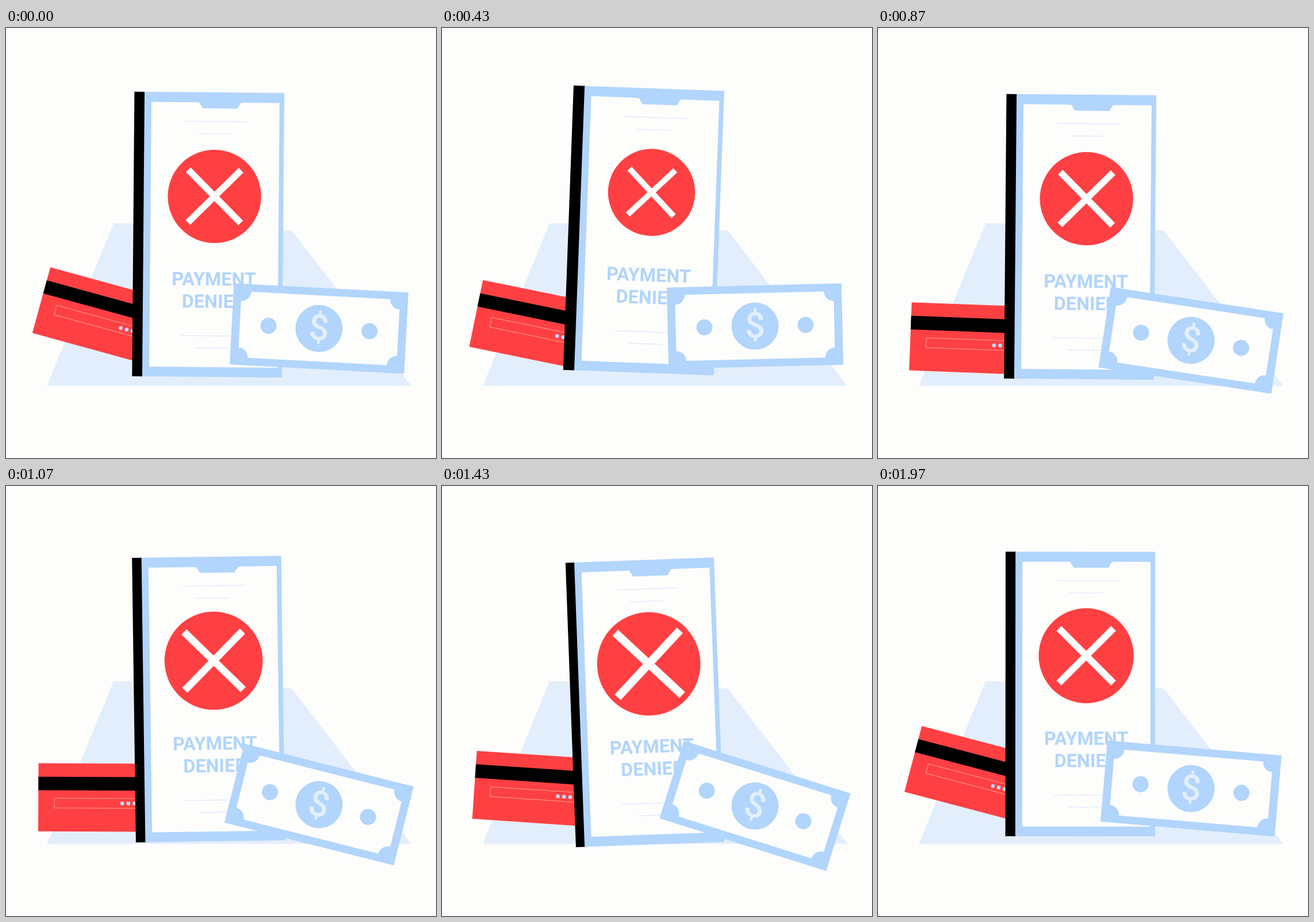
An HTML page for the animation above (2 s loop, 748x748 px).

```html
<!DOCTYPE html>
<html lang="en">
<head>
<meta charset="utf-8">
<title>Payment denied</title>
<style>
  html, body { margin: 0; width: 100%; height: 100%; overflow: hidden; background: #fdfdfc; }
  svg { display: block; width: 100vw; height: 100vh; }
  text { font-family: Roboto, Arial, sans-serif; text-anchor: middle; }
  .blue { fill: #b1d5fc; }
  .pale { fill: #e3eefc; }
  .red { fill: #ff4042; }
  .white { fill: #fdfdfc; }
  .rule { fill: none; stroke: #c8defb; stroke-width: .8; }
  .cross { fill: none; stroke: #fdfdfc; stroke-width: 12; }
  .label { font-size: 32.4px; font-weight: 700; }
  .dollar { font-size: 62px; font-weight: 500; }
</style>
</head>
<body>
<svg viewBox="0 0 748 748">
  <path class="pale" d="M187 340H300V352H497L705 622.5H71Z"/>

  <g id="card">
    <rect class="red" x="-146" y="-59.25" width="198" height="118.5"/>
    <rect x="-146" y="-35.8" width="198" height="23.6"/>
    <rect x="-118" y="1.5" width="155" height="17" fill="none" stroke="#ffa79c" stroke-width=".9"/>
    <g fill="#b8d9fb">
      <circle cy="10.2" r="3.4"/>
      <circle cx="10.6" cy="10.2" r="3.4"/>
      <circle cx="21.2" cy="10.2" r="3.4"/>
    </g>
  </g>

  <g id="phone">
    <rect id="edge" y="-247.5" height="495"/>
    <rect class="blue" x="-121.5" y="-247.5" width="243" height="495"/>
    <path class="white" d="M-109.5 -230H-26.5L-20 -219.5H40L46.5 -230H113.5V230.5H-109.5Z"/>
    <path class="rule" d="M-51.5 -197H58M-27.5 -175.5H30.5M-54.5 176H58M-27.5 197H30.5"/>
    <g id="badge">
      <circle class="red" r="82.8"/>
      <path id="cross" class="cross" d="M-47.7 -47.7L47.7 47.7M47.7 -47.7L-47.7 47.7"/>
    </g>
    <text class="label blue" x="1.8" y="88.4">PAYMENT</text>
    <text class="label blue" x="1.8" y="127.2">DENIED</text>
  </g>

  <g id="bill">
    <rect class="blue" x="-152" y="-70.75" width="304" height="141.5"/>
    <path class="white" d="M-121 -57.5H121A17 17 0 0 0 138 -40.5V40.5A17 17 0 0 0 121 57.5H-121A17 17 0 0 0 -138 40.5V-40.5A17 17 0 0 0 -121 -57.5Z"/>
    <circle class="blue" r="41"/>
    <circle class="blue" cx="-88" r="14"/>
    <circle class="blue" cx="88" r="14"/>
    <text class="dollar pale" y="20">$</text>
  </g>
</svg>
<script>
  const LOOP = 2000;   // ms
  const FPS = 30;
  const CYCLE = 61;    // steps in one full swing, one more than the loop shows

  const [card, phone, edge, badge, cross, bill] =
    ['card', 'phone', 'edge', 'badge', 'cross', 'bill'].map(id => document.getElementById(id));

  const place = (el, x, y, angle) =>
    el.setAttribute('transform', `translate(${x} ${y}) rotate(${angle})`);

  function draw(ms) {
    // the small offset accounts for step times rounded to 10 ms
    const step = Math.min(59, Math.floor((ms % LOOP + 3.4) * FPS / 1000));
    const swing = (mid, size, peak) =>
      mid + size * Math.cos(2 * Math.PI * (step - peak) / CYCLE);

    place(card, 202.3, swing(527.3, 15.4, 29.2), swing(7.9, -7.7, 33.1));
    place(phone, 360.5, swing(364.2, -11.9, 11.3), swing(0, 2.1, 13.05));
    place(bill, 544.5, swing(537.3, 21.5, 38.5), swing(8, 9.8, 40.6));

    const depth = swing(17.2, 2, 13.05);
    edge.setAttribute('x', -121.5 - depth);
    edge.setAttribute('width', depth + 1);

    const scale = swing(1, -0.086, 13.05);
    badge.setAttribute('transform', `translate(1.6 -66.6) scale(${scale})`);
    cross.setAttribute('transform', `scale(${scale})`);
  }

  const start = performance.now();
  function tick() {
    draw(performance.now() - start);
    requestAnimationFrame(tick);
  }
  tick();
</script>
</body>
</html>
```
